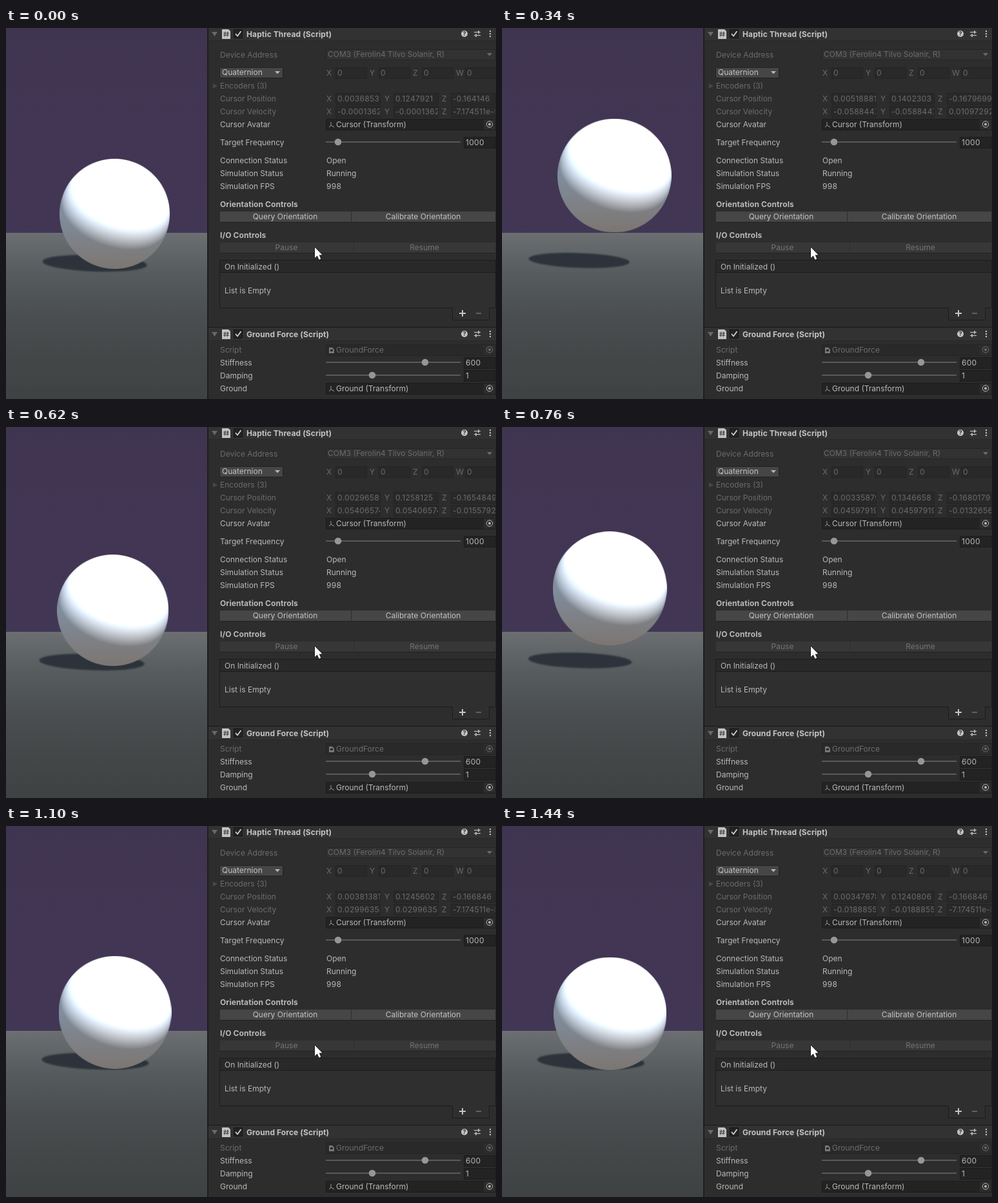
These frames come from a looping animation (760x576 px, 1.51 s). An HTML page with a canvas:

```html
<!DOCTYPE html>
<html lang="en">
<head>
<meta charset="utf-8">
<title>Bouncing sphere inspector</title>
<style>
html, body { margin: 0; width: 100%; height: 100%; overflow: hidden; background: #2d2d2d; }
canvas { display: block; }
</style>
</head>
<body>
<canvas id="stage" width="760" height="576"></canvas>
<script>
const ctx = document.getElementById('stage').getContext('2d');
const LOOP = 1510;
const TEXT = '#b9b9b9', BRIGHT = '#c4c4c4', DIM = '#6c6c6c';
const FIELD = '#232323', FIELD_DIM = '#292929', EDGE = '#1c1c1c';

// Turning points of the bounce, joined by cosine easing.
const TURNS = [
  { t: 0, x: 168.5, y: 288.5, r: 85.5 },
  { t: 300, x: 175, y: 224.5, r: 88.5 },
  { t: 540, x: 165.3, y: 293.5, r: 86 },
  { t: 825, x: 167.5, y: 244.5, r: 88.7 },
  { t: 1035, x: 169, y: 293.5, r: 87.5 },
  { t: 1240, x: 169, y: 275.5, r: 87.5 },
  { t: 1500, x: 167.5, y: 293.5, r: 87.5 }
];

function sample(t) {
  const i = TURNS.findIndex(turn => turn.t > t), a = TURNS[i - 1], b = TURNS[i];
  const span = b.t - a.t, phase = Math.PI * (t - a.t) / span;
  const ease = key => a[key] + (b[key] - a[key]) * (1 - Math.cos(phase)) / 2;
  const speed = key => (b[key] - a[key]) * Math.sin(phase) * Math.PI / 2 / span;
  const x = ease('x'), y = ease('y'), r = ease('r');
  const vy = -.26 * speed('y') - .0001362, vz = -1.35 * speed('r') - .00007174511;
  return {
    x, y, r,
    position: [.003685312 + (x - 168.5) * .000257, .1247921 + (288.5 - y) * .00026,
      -.164146 - (r - 85.5) * .00135],
    velocity: [vy, vy, vz]
  };
}

function rect(x, y, w, h, fill, edge) {
  ctx.fillStyle = fill;
  ctx.fillRect(x, y, w, h);
  if (edge) {
    ctx.strokeStyle = edge;
    ctx.lineWidth = 1;
    ctx.strokeRect(x + .5, y + .5, w - 1, h - 1);
  }
}
function text(s, x, y, color = TEXT, weight = 400, align = 'left') {
  ctx.font = `${weight} 12px Inter, sans-serif`;
  ctx.letterSpacing = /^[-\d.e]+$/.test(s) ? '.3px' : weight > 400 ? '.1px' : '0px';
  ctx.textAlign = align;
  ctx.fillStyle = color;
  ctx.fillText(s, x, y + 4);
}
function poly(points, color) {
  ctx.fillStyle = color;
  ctx.beginPath();
  points.forEach(([x, y]) => ctx.lineTo(x, y));
  ctx.closePath();
  ctx.fill();
}
function line(points, color, width = 1) {
  ctx.strokeStyle = color;
  ctx.lineWidth = width;
  ctx.beginPath();
  points.forEach(([x, y]) => ctx.lineTo(x, y));
  ctx.stroke();
}
function dot(x, y, r, color) {
  ctx.fillStyle = color;
  ctx.beginPath();
  ctx.arc(x, y, r, 0, 7);
  ctx.fill();
}
const down = (x, y, color) => poly([[x - 4, y - 2], [x + 4, y - 2], [x, y + 2.5]], color);

function field(x, y, w, value, dim) {
  rect(x, y - 9, w, 18, dim ? FIELD_DIM : FIELD, dim ? '#232323' : EDGE);
  ctx.save();
  ctx.beginPath();
  ctx.rect(x + 1, y - 9, w - 2, 18);
  ctx.clip();
  text(value, x + 3, y, dim ? DIM : TEXT);
  ctx.restore();
}
function button(label, x, y, w, dim) {
  rect(x, y - 8, w, 16, dim ? '#373737' : '#464646');
  rect(x, y + 8, w, 1, '#222');
  text(label, x + w / 2 - .5, y, dim ? '#747474' : BRIGHT, 400, 'center');
}
function slider(label, y, knob, value) {
  text(label, 332, y);
  rect(496, y - 2, 209, 2, '#5a5a5a');
  dot(knob, y - 1, 5.3, '#969696');
  field(710, y, 50, value);
}
function page(x, y, w, h, color) {
  poly([[x, y], [x + w - 3, y], [x + w, y + 3], [x + w, y + h], [x, y + h]], color);
}
function objectField(label, y, value, dim) {
  const ink = dim ? DIM : TEXT;
  text(label, 332, y, ink);
  rect(496, y - 9, 264, 18, dim ? FIELD_DIM : FIELD, dim ? '#242424' : EDGE);
  rect(741, y - 8, 18, 16, '#2d2d2d');
  ctx.strokeStyle = ink;
  ctx.lineWidth = 1;
  ctx.beginPath();
  ctx.arc(750, y - .5, 4.7, 0, 7);
  ctx.stroke();
  dot(750, y - .5, 2, ink);
  if (dim) {
    page(501, y - 4, 8, 9, '#777');
    rect(503, y - 1, 4, 3, '#2a2a2a');
  } else {
    line([[504, y - 4], [504, y + 1], [501, y + 4]], '#9a9a9a');
    line([[504, y + 1], [509, y + 4]], '#9a9a9a');
  }
  text(value, 512, y, ink);
}
function header(title, y) {
  rect(314, y - 11, 446, 21, '#323232');
  rect(314, y - 11, 446, 1, '#181818');
  rect(314, y + 10, 446, 1, '#282828');
  poly([[319, y - 3], [328, y - 3], [323.5, y + 4]], '#686868');
  page(335, y - 7, 13, 15, BRIGHT);
  for (const d of [-2, 2]) {
    line([[342 + d, y - 3.5], [341 + d, y + 4.5]], '#333');
    line([[337, y + .5 + d * .75], [346, y + .5 + d * .75]], '#333');
  }
  rect(353, y - 7, 14, 14, FIELD, '#161616');
  line([[356, y], [359, y + 3.5], [364.5, y - 4]], '#d0d0d0', 1.8);
  text(title, 373, y + 1, BRIGHT, 700);
  dot(711, y, 5, BRIGHT);
  ctx.font = '700 9px Inter, sans-serif';
  ctx.textAlign = 'center';
  ctx.fillStyle = '#303030';
  ctx.fillText('?', 711, y + 3.3);
  for (const side of [-1, 1]) {
    line([[726, y + 2.5 * side], [736, y + 2.5 * side]], BRIGHT, 1.2);
    line([[731 - 2 * side, y], [731 - 2 * side, y + 5 * side]], BRIGHT, 1.5);
  }
  for (const d of [-4, 0, 4]) dot(751, y + d, 1.2, BRIGHT);
}
function vector(names, values, y, step, width) {
  values.forEach((value, i) => {
    const left = Math.round(497 + i * step);
    text(names[i], left, y, DIM);
    field(left + 14, y, width, value, true);
  });
}
const number = n => Math.abs(n) < 1e-4 ? n.toExponential(6) : String(+n.toPrecision(7));

function panel(position, velocity) {
  rect(312, 0, 448, 576, '#2d2d2d');
  rect(312, 0, 2, 576, '#1e1e1e');
  header('Haptic Thread (Script)', 9);
  text('Device Address', 332, 42, DIM);
  rect(496, 33, 264, 17, '#323232', '#262626');
  text('COM3 (Ferolin4 Tilvo Solanir, R)', 499, 41, DIM);
  down(750, 41, DIM);
  rect(331, 61, 99, 17, '#464646', '#222');
  text('Quaternion', 335, 69, BRIGHT);
  down(421, 69, '#b4b4b4');
  vector('XYZW', ['0', '0', '0', '0'], 70, 67, 49);
  poly([[321, 86], [321, 94], [328, 90]], '#484848');
  text('Encoders (3)', 332, 90, DIM);
  text('Cursor Position', 332, 110, DIM);
  vector('XYZ', position.map(number), 110, 89.7, 70);
  text('Cursor Velocity', 332, 130, DIM);
  vector('XYZ', velocity.map(number), 130, 89.7, 70);
  objectField('Cursor Avatar', 150, 'Cursor (Transform)');
  slider('Target Frequency', 178, 515, '1000');
  [['Connection Status', 'Open'], ['Simulation Status', 'Running'], ['Simulation FPS', '998']]
    .forEach(([label, value], i) => {
      text(label, 332, 206 + 20 * i);
      text(value, 497, 206 + 20 * i);
    });
  text('Orientation Controls', 332, 274, TEXT, 700);
  button('Query Orientation', 332, 293, 203);
  button('Calibrate Orientation', 536, 293, 223);
  text('I/O Controls', 332, 322, TEXT, 700);
  button('Pause', 332, 341, 207, true);
  button('Resume', 540, 341, 219, true);
  rect(331, 360, 429, 75, '#2f2f2f', EDGE);
  rect(332, 361, 427, 19, '#292929');
  rect(332, 379, 427, 1, EDGE);
  text('On Initialized ()', 339, 371);
  text('List is Empty', 339, 408);
  rect(692, 434, 58, 20, '#2f2f2f', EDGE);
  rect(693, 433, 56, 2, '#2f2f2f');
  line([[703, 443], [713, 443]], BRIGHT, 2);
  line([[708, 438], [708, 448]], BRIGHT, 2);
  line([[729, 443], [737, 443]], '#707070', 1.5);
  header('Ground Force (Script)', 475);
  objectField('Script', 500, 'GroundForce', true);
  slider('Stiffness', 520, 650, '600');
  slider('Damping', 540, 568, '1');
  objectField('Ground', 560, 'Ground (Transform)');
}

// Lambert-lit sphere with a sky-to-ground ambient tint.
function makeBall(radius) {
  const sprite = document.createElement('canvas'), size = radius * 2;
  sprite.width = sprite.height = size;
  const c = sprite.getContext('2d'), image = c.createImageData(size, size);
  const sky = [128, 141, 157], earth = [124, 118, 113];
  for (let i = 0; i < size * size; i++) {
    const x = (i % size + .5) / radius - 1, y = 1 - (Math.floor(i / size) + .5) / radius;
    const rho = Math.hypot(x, y), z = Math.sqrt(Math.max(0, 1 - rho * rho));
    const light = 300 * Math.max(0, .25 * x + .75 * y + .6 * z);
    const low = Math.min(1, Math.max(0, -y));
    sky.forEach((s, j) => image.data[i * 4 + j] = s + (earth[j] - s) * low + light);
    image.data[i * 4 + 3] = 255 * Math.min(1, Math.max(0, (1 - rho) * radius + .5));
  }
  c.putImageData(image, 0, 0);
  return sprite;
}
const ball = makeBall(90);

function gradient(y0, y1, ...colors) {
  const g = ctx.createLinearGradient(0, y0, 0, y1);
  colors.forEach((c, i) => g.addColorStop(i / (colors.length - 1), c));
  return g;
}
const sky = gradient(0, 318, '#403551', '#423655');
const ground = gradient(318, 576, '#6b6f72', '#565b5d', '#4a4e50', '#434748', '#3e4243');

function scene({ x, y, r }) {
  rect(0, 0, 312, 318, sky);
  rect(0, 318, 312, 258, ground);
  const height = 291 - y;
  ctx.save();
  ctx.filter = 'blur(.8px)';
  ctx.fillStyle = '#2c333b';
  ctx.beginPath();
  ctx.ellipse(x - 30 - .4 * height, 365.5 - .075 * height, r * .95 - .09 * height,
    12.7 - .02 * height, .035, 0, 7);
  ctx.fill();
  ctx.restore();
  ctx.drawImage(ball, x - r, y - r, 2 * r, 2 * r);
}

function pointer() {
  ctx.lineJoin = 'round';
  const arrow = [[479, 340.5], [479, 357], [482.8, 353.5], [485.5, 359.8], [488.3, 358.5],
    [485.7, 352.5], [490.5, 352.2]];
  line([...arrow, arrow[0]], '#111', 1.5);
  poly(arrow, '#fff');
}

const stepStart = k => 70 * k - 10 * ((k > 4) + (k > 13) + (k > 20));
function draw(now) {
  const t = now % LOOP;
  let k = 0;
  while (k < 21 && stepStart(k + 1) <= t) k++;
  const state = sample(stepStart(k));
  scene(state);
  panel(state.position, state.velocity);
  pointer();
}
const start = performance.now();
function tick() {
  draw(performance.now() - start);
  requestAnimationFrame(tick);
}
tick();
</script>
</body>
</html>
```
